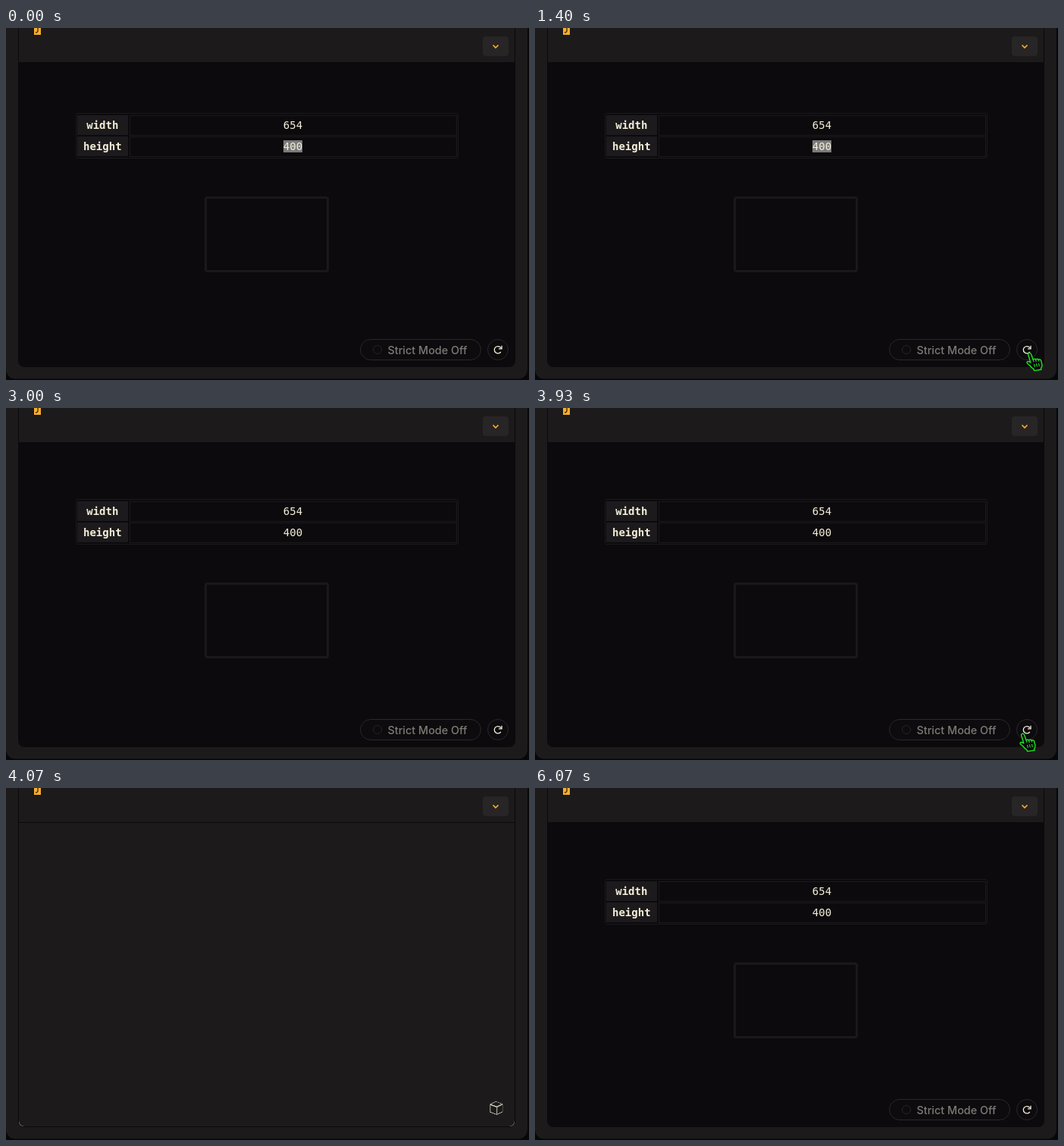
An HTML page that plays this animation: 690x464 px, repeating every 7270 ms.

```html
<!DOCTYPE html>
<html lang="en">
<head>
<meta charset="utf-8">
<title>Preview refresh</title>
<style>
  :root { --loop: 7270ms; --ink: #f4eed8; --frame: #1c1a1b; --dark: #0c0a0d; }
  html, body { margin: 0; width: 100%; height: 100%; overflow: hidden; background: #070608; }
  #stage { position: absolute; left: 0; top: 0; width: 690px; height: 464px; overflow: hidden; }
  svg { position: absolute; left: 0; top: 0; display: block; }
  text { text-anchor: middle; fill: var(--ink); }
  .mono { font: 14px "DejaVu Sans Mono", monospace; }
  .mono .head { font-weight: bold; }
  .label { font: 500 14.4px Inter, sans-serif; text-anchor: start; fill: #7d7b74; }

  .anim { animation: var(--loop) linear infinite; }
  #content { animation-name: shift; }
  #select { animation-name: select; }
  #blank { animation-name: blank; }
  #loader { animation-name: loader; position: absolute; inset: 0; }
  #cursor { animation-name: point; animation-timing-function: cubic-bezier(.2, .5, .4, 1); }

  #cover {
    position: absolute; left: 17px; top: 46px; width: 654px; height: 400px;
    background: var(--frame); border-radius: 0 0 7px 7px;
  }
  #cube {
    position: absolute; left: 641px; top: 415.5px; width: 12px; height: 12px;
    transform-style: preserve-3d; animation-name: spin;
  }
  #cube i {
    position: absolute; inset: 0; box-sizing: border-box;
    border: 1px solid var(--ink); background: var(--frame); backface-visibility: hidden;
    transform: var(--turn) translateZ(6px);
  }

  @keyframes shift {
    0%, 20.07% { transform: translateY(0); }
    20.08%, 100% { transform: translateY(8px); }
  }
  @keyframes select {
    0%, 20.07% { opacity: 1; }
    20.08%, 100% { opacity: 0; }
  }
  @keyframes blank {
    0%, 20.07% { opacity: 0; }
    20.08%, 22.9% { opacity: 1; }
    22.91%, 54.87% { opacity: 0; }
    54.88%, 56.7% { opacity: 1; }
    56.71%, 100% { opacity: 0; }
  }
  @keyframes loader {
    0%, 21.86% { opacity: 0; }
    21.87%, 31.09% { opacity: 1; }
    34.8%, 55.56% { opacity: 0; }
    55.57%, 60.52% { opacity: 1; }
    64.24%, 100% { opacity: 0; }
  }
  @keyframes spin {
    0%, 21.83% { transform: rotateX(-25.5deg) rotateY(45deg); }
    34.8% { transform: rotateX(-25.5deg) rotateY(384.5deg); }
    55.57% { transform: rotateX(-25.5deg) rotateY(38deg); }
    64.24%, 100% { transform: rotateX(-25.5deg) rotateY(264.8deg); }
  }
  @keyframes point {
    0%, 9.63% { transform: translate(650px, 465px); opacity: 1; }
    19.26%, 21.86% { transform: translate(648px, 427px); opacity: 1; }
    21.87% { transform: translate(648px, 427px); opacity: 0; }
    44.42% { transform: translate(632px, 465px); opacity: 0; }
    44.43% { transform: translate(632px, 465px); opacity: 1; }
    54.06%, 55.56% { transform: translate(639px, 428px); opacity: 1; }
    55.57%, 100% { transform: translate(639px, 428px); opacity: 0; }
  }
</style>
</head>
<body>
<div id="stage">
  <svg width="690" height="464" viewBox="0 0 690 464">
    <!-- window and editor strip -->
    <rect y="-20" width="688" height="482.5" rx="12" fill="#1c1a1b"/>
    <rect x="16.5" y="-20" width="655" height="466.5" rx="7" fill="#1c1a1b" stroke="#0a090b"/>
    <path d="M17 45.5H671" stroke="#0a090b"/>
    <rect x="37" width="9" height="9" fill="#f9ae2b"/>
    <path d="M42 0V3.5Q42 6 39 6" fill="none" stroke="#3a2a14" stroke-width="1.3"/>
    <rect x="629" y="11" width="34" height="26" rx="4" fill="#272526"/>
    <path d="M642.5 22.5L646 26L649.5 22.5" fill="none" stroke="#f9ae2b" stroke-width="1.7"/>

    <!-- preview -->
    <path id="view" d="M17 45H671V439Q671 446 664 446H24Q17 446 17 439Z" fill="#0c0a0d"/>
    <g id="content" class="anim mono">
      <g fill="none" stroke="#1b191c">
        <rect x="92.5" y="112.5" width="504" height="59" rx="2"/>
        <rect x="163.5" y="115.5" width="431" height="26"/>
        <rect x="163.5" y="143.5" width="431" height="26"/>
        <rect x="263.5" y="223.5" width="161" height="97" rx="2" stroke="#1a181b" stroke-width="3"/>
      </g>
      <path d="M94 115h67v26h-67zM94 143h67v26h-67z" fill="#1c1a1c"/>
      <text class="head" x="127.3" y="133">width</text>
      <text class="head" x="127.3" y="161">height</text>
      <text x="378.5" y="133">654</text>
      <g id="select" class="anim"><rect x="366" y="148" width="25" height="16" fill="#7b7a7a"/></g>
      <text x="378.5" y="161">400</text>
    </g>
    <g id="blank" class="anim">
      <path d="M17 46H671V439Q671 446 664 446H24Q17 446 17 439Z" fill="#fdfdfd"/>
    </g>

    <!-- controls -->
    <g fill="#0d0b0e" stroke="#2a2829">
      <rect x="467.5" y="410.5" width="159" height="27" rx="13.5"/>
      <circle cx="649" cy="424" r="13.5"/>
      <circle cx="490" cy="424" r="5.5" stroke="#262426"/>
    </g>
    <text class="label" x="503.5" y="430">Strict Mode Off</text>
    <g fill="none" stroke="#f4eed8" stroke-width="1.3">
      <path d="M652.8 427A4.7 4.7 0 1 1 652.6 421.2L653.8 422.6"/>
      <path d="M654 418.8V422.9H650"/>
    </g>
  </svg>

  <div id="loader" class="anim">
    <div id="cover"></div>
    <div id="cube" class="anim">
      <i style="--turn: rotateY(0deg)"></i>
      <i style="--turn: rotateY(90deg)"></i>
      <i style="--turn: rotateY(180deg)"></i>
      <i style="--turn: rotateY(270deg)"></i>
      <i style="--turn: rotateX(90deg)"></i>
      <i style="--turn: rotateX(-90deg)"></i>
    </div>
  </div>

  <svg width="690" height="464" viewBox="0 0 690 464">
    <g id="cursor" class="anim" stroke="#1fe31f" stroke-width="1.4" stroke-linejoin="round">
      <path fill="#0c0a0d" d="M2.5 3Q3 .8 5 1.3Q6.5 2 7 4L9 10Q11 8.5 12.5 10Q14.5 8.5 16 10Q18 9 19.5 11L21 17Q21 20 19.5 21.5L20 23.2L10.5 24.6L10 22.6Q7 21 5 18L1.3 15Q.5 13 2.5 12.5Q4 12.5 5.8 14Z"/>
      <path fill="none" stroke-width="1.1" d="M9 10L10 13M12.5 10L13.3 13M16 10L16.8 12.5M10.5 16L11.3 20M13.5 15.5L14.3 19.5M16.5 15L17.3 19"/>
    </g>
  </svg>
</div>
</body>
</html>
```
